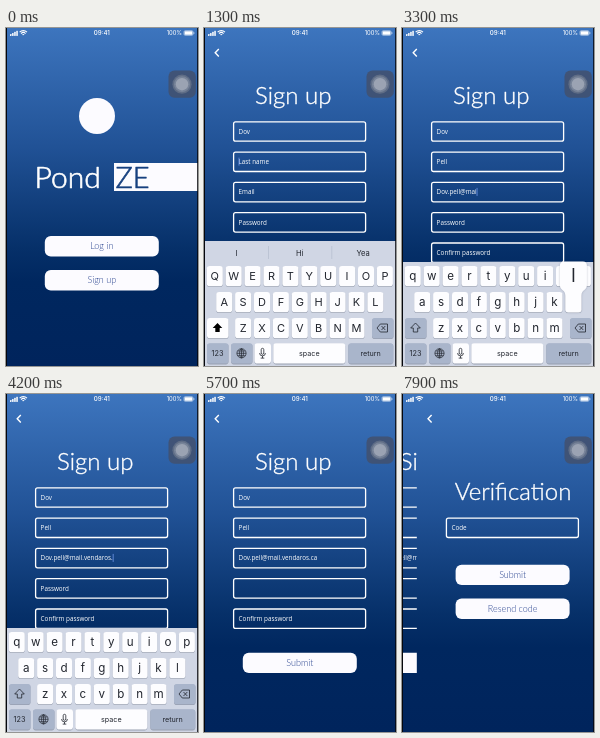
An HTML page with a canvas that plays this animation: 192x338 px, repeating every 8000 ms.

```html
<!DOCTYPE html>
<html lang="en">
<head>
<meta charset="utf-8">
<title>Sign up flow</title>
<style>
  html, body { margin: 0; width: 100%; height: 100%; overflow: hidden; background: #000; }
  canvas { display: block; width: 100vw; height: 100vh; }
</style>
</head>
<body>
<canvas id="stage"></canvas>
<script>
const W = 192, H = 338, LOOP = 8000;
const THIN = '"Lato", sans-serif', TEXT = '"Open Sans", sans-serif', KEY = '"Inter", sans-serif';
const INK = '#22262f', PAPER = '#fcfbff';
const cv = document.getElementById('stage');
const c = cv.getContext('2d');

const clamp = v => Math.max(0, Math.min(1, v));
const easeOut = (t, start, dur) => 1 - (1 - clamp((t - start) / dur)) ** 3;

// Typing schedule: characters and the moment each one lands
const typed = [
  { text: 'Dov', at: [700, 800, 900] },
  { text: 'Pell', at: [1400, 1500, 1600, 1700] },
  { text: 'Dov.pell@mail.vendaros.ca',
    at: [2000, 2120, 2240, 2460, 2660, 2760, 2840, 2920, 3040, 3140, 3200, 3270, 3340,
         3490, 3600, 3670, 3740, 3800, 3860, 3920, 3980, 4020, 4110, 4300, 4420] }
];
const focusAt = [520, 1050, 1850, 4750];
const hints = ['First name', 'Last name', 'Email', 'Password', 'Confirm password'];
const fieldY = i => 93.8 + i * 30.3;

function valueAt(i, t) {
  const f = typed[i];
  return f ? f.text.slice(0, f.at.filter(a => a <= t).length) : '';
}

function box(x, y, w, h, r, fill) {
  c.beginPath();
  c.roundRect(x, y, w, h, r);
  if (fill) { c.fillStyle = fill; c.fill(); }
}

function label(s, x, y, size, family, color, align = 'left', weight = 400) {
  c.font = `${weight} ${size}px ${family}`;
  c.fillStyle = color;
  c.textAlign = align;
  c.textBaseline = 'alphabetic';
  c.fillText(s, x, y);
}

// Light lettering with a slightly thickened stroke
function heading(s, x, y, size, color, align, extra) {
  label(s, x, y, size, THIN, color, align, 300);
  c.strokeStyle = color;
  c.lineWidth = extra;
  c.lineJoin = 'round';
  c.strokeText(s, x, y);
}

function line(points, color, width) {
  c.beginPath();
  points.forEach(([x, y], i) => i ? c.lineTo(x, y) : c.moveTo(x, y));
  c.strokeStyle = color;
  c.lineWidth = width;
  c.stroke();
}

function backdrop() {
  const g = c.createLinearGradient(0, 0, 0, H);
  g.addColorStop(0, '#3d75be');
  g.addColorStop(0.35, '#215296');
  g.addColorStop(0.65, '#063069');
  g.addColorStop(0.75, '#00275f');
  g.addColorStop(1, '#00245c');
  c.fillStyle = g;
  c.fillRect(0, 0, W, H);
}

function button(s, y, pressed) {
  box(38.8, y, 114, 20.4, 6, pressed ? '#b9c4da' : PAPER);
  label(s, 95.8, y + 13, 9, THIN, '#2b4590', 'center', 300);
}

function field(y, s, caret) {
  box(29.6, y, 132, 19.4, 2);
  c.strokeStyle = '#fff';
  c.lineWidth = 1.3;
  c.stroke();
  label(s, 34.6, y + 12, 6.3, TEXT, '#fff');
  if (caret !== undefined) {
    c.fillStyle = '#6f97ea';
    c.fillRect(34.6 + c.measureText(caret).width, y + 5.5, 0.8, 8);
  }
}

function chevron() {
  line([[14.8, 21], [11.2, 24.8], [14.8, 28.6]], '#fff', 1.4);
}

function home(t) {
  backdrop();
  c.beginPath();
  c.arc(91, 88, 18, 0, 7);
  c.fillStyle = PAPER;
  c.fill();
  heading('Pond', 28.5, 160, 30, '#fff', 'left', 0.7);
  c.fillStyle = PAPER;
  c.fillRect(108, 135, 84, 28);
  heading('ZE', 109.5, 160, 29, '#17407f', 'left', 0.6);
  button('Log in', 208);
  button('Sign up', 242, t > 60 && t < 160);
}

function signUp(t) {
  backdrop();
  chevron();
  heading('Sign up', 89.2, 76, 24, '#fff', 'center', 0.4);
  const focus = t < 4800 ? focusAt.filter(a => a <= t).length - 1 : -1;
  hints.forEach((hint, i) => {
    const v = valueAt(i, t);
    const hidden = (i === 3 && t > 5300) || (i === 4 && t > 6500);
    field(fieldY(i), hidden ? '' : v || hint, i === focus ? v : undefined);
  });
  button('Submit', 258.7, t > 7560 && t < 7700);
}

function verify() {
  backdrop();
  chevron();
  heading('Verification', 96.2, 106, 24, '#fff', 'center', 0.4);
  field(fieldY(1), 'Code');
  button('Submit', 170.7);
  button('Resend code', 204.6);
}

function push(from, to, p) {
  c.save();
  c.translate(-0.3 * W * p, 0);
  from();
  c.restore();
  c.save();
  c.translate(W * (1 - p), 0);
  to();
  c.restore();
}

// Keyboard
const rowY = [248, 274, 300, 325.3];
const SPECIAL = '#a9b5cb';

function keyList(mode) {
  const keys = [];
  const row = (chars, x, step, y, w) =>
    [...chars].forEach((ch, i) => keys.push({ ch, x: x + i * step, y, w }));
  if (mode === 'sym') {
    row('1234567890', 10.8, 18.9, rowY[0], 16);
    row('-/:;()$&@"', 10.8, 18.9, rowY[1], 16);
    row('.,?!’', 43.5, 26, rowY[2], 23);
  } else {
    const shape = s => mode === 'upper' ? s.toUpperCase() : s;
    row(shape('qwertyuiop'), 10.8, 18.9, rowY[0], 16);
    row(shape('asdfghjkl'), 20.2, 18.9, rowY[1], 16);
    row(shape('zxcvbnm'), 39.1, 18.9, rowY[2], 16);
  }
  return keys;
}

function cap(x, y, w, fill = '#fdfdff') {
  box(x, y - 9.5, w, 20.6, 2.8, '#979fb0');
  box(x, y - 10, w, 20.2, 2.8, fill);
}

function shiftIcon(on) {
  c.beginPath();
  [[13.5, 295], [18.3, 300], [15.7, 300], [15.7, 304], [11.3, 304], [11.3, 300], [8.7, 300]]
    .forEach(([x, y]) => c.lineTo(x, y));
  c.closePath();
  c.fillStyle = c.strokeStyle = on ? '#000' : INK;
  c.lineWidth = 0.8;
  on ? c.fill() : c.stroke();
}

function deleteIcon() {
  line([[173, 300], [176.3, 296], [183.5, 296], [183.5, 304], [176.3, 304], [173, 300]], INK, 0.8);
  line([[177.5, 298], [181.3, 302]], INK, 0.8);
  line([[181.3, 298], [177.5, 302]], INK, 0.8);
}

function globeIcon(x, y) {
  c.strokeStyle = INK;
  c.lineWidth = 0.7;
  c.beginPath();
  c.ellipse(x, y, 4.6, 4.6, 0, 0, 7);
  c.moveTo(x + 2, y);
  c.ellipse(x, y, 2, 4.6, 0, 0, 7);
  c.stroke();
  line([[x - 4.6, y], [x + 4.6, y]], INK, 0.7);
  line([[x, y - 4.6], [x, y + 4.6]], INK, 0.7);
  line([[x - 4, y - 2.3], [x + 4, y - 2.3]], INK, 0.6);
  line([[x - 4, y + 2.3], [x + 4, y + 2.3]], INK, 0.6);
}

function micIcon(x, y) {
  box(x - 1.3, y - 5, 2.6, 6, 1.3);
  c.strokeStyle = INK;
  c.lineWidth = 0.8;
  c.stroke();
  c.beginPath();
  c.arc(x, y - 0.3, 2.9, 0, Math.PI);
  c.stroke();
  line([[x, y + 2.6], [x, y + 4.8]], INK, 0.8);
  line([[x - 1.8, y + 4.8], [x + 1.8, y + 4.8]], INK, 0.8);
}

function popup({ ch, x, y, w }) {
  const k = w / 2, b = k + 5.5, top = y - 40.5;
  c.save();
  c.shadowColor = 'rgba(40,50,75,.3)';
  c.shadowBlur = 2;
  c.beginPath();
  c.moveTo(x - b + 4, top);
  c.arcTo(x + b, top, x + b, top + 5, 4);
  c.lineTo(x + b, y - 17);
  c.bezierCurveTo(x + b, y - 11, x + k, y - 13, x + k, y - 6);
  c.arcTo(x + k, y + 10.5, x, y + 10.5, 3);
  c.arcTo(x - k, y + 10.5, x - k, y, 3);
  c.lineTo(x - k, y - 6);
  c.bezierCurveTo(x - k, y - 13, x - b, y - 11, x - b, y - 17);
  c.arcTo(x - b, top, x - b + 4, top, 4);
  c.fillStyle = '#fdfdff';
  c.fill();
  c.restore();
  label(ch, x, y - 20, 18, KEY, INK, 'center');
}

function keyboard(t) {
  const shown = easeOut(t, 540, 130) - easeOut(t, 4800, 220);
  if (shown <= 0) return;
  const i = t < 1050 ? 0 : t < 1850 ? 1 : 2;
  const f = typed[i];
  const sym = f.at.some((a, n) => '.@'.includes(f.text[n]) && t > a - 60 && t < a + 70);
  const mode = sym ? 'sym' : valueAt(i, t) ? 'lower' : 'upper';
  const top = i < 2 ? 213 : 234;

  c.save();
  c.translate(0, (1 - shown) * (H - top));
  c.fillStyle = '#d0d6e4';
  c.fillRect(0, top, W, H - top);
  if (i < 2) {
    ['I', 'Hi', 'Yea'].forEach((s, n) => label(s, 32.5 + n * 63.3, 228, 7.6, KEY, INK, 'center'));
    c.fillStyle = '#b3bccd';
    c.fillRect(64, 218, 0.7, 13);
    c.fillRect(127.5, 218, 0.7, 13);
  }

  const keys = keyList(mode);
  keys.forEach(k => {
    cap(k.x - k.w / 2, k.y, k.w);
    label(k.ch, k.x, k.y + (mode === 'lower' ? 3.5 : 4), mode === 'lower' ? 11.6 : 11, KEY, INK, 'center');
  });

  cap(3, rowY[2], 21.5, mode === 'upper' ? '#fdfdff' : SPECIAL);
  if (sym) label('#+=', 13.7, 302.5, 6.5, KEY, INK, 'center');
  else shiftIcon(mode === 'upper');
  cap(168, rowY[2], 21.5, SPECIAL);
  deleteIcon();

  cap(3, rowY[3], 21.5, SPECIAL);
  label(sym ? 'ABC' : '123', 13.5, 327.9, 7.3, KEY, INK, 'center');
  cap(27, rowY[3], 21.5, SPECIAL);
  globeIcon(37.5, 325.3);
  cap(50.5, rowY[3], 16.5);
  micIcon(58.5, 325.3);
  cap(69.3, rowY[3], 72);
  label('space', 105.3, 327.6, 7.2, KEY, INK, 'center');
  cap(144.3, rowY[3], 45, SPECIAL);
  label('return', 166.6, 327.6, 7.2, KEY, INK, 'center');

  const hit = f.at.findLastIndex(a => t >= a - 50 && t < a + 50);
  const key = hit >= 0 && keys.find(k => k.ch.toLowerCase() === f.text[hit].toLowerCase());
  if (key) popup(key);
  c.restore();
}

function statusBar() {
  for (let i = 0; i < 4; i++) box(4 + i * 2.1, 6 - i * 1.1, 1.5, 1.9 + i * 1.1, 0.4, '#fff');
  c.strokeStyle = '#fff';
  c.lineWidth = 1.1;
  for (const r of [1.2, 3.2, 5.2]) {
    c.beginPath();
    c.arc(17.3, 7.8, r, -Math.PI * 0.75, -Math.PI * 0.25);
    c.stroke();
  }
  label('09:41', 95.8, 7.2, 6.2, KEY, '#fff', 'center', 500);
  label('100%', 176, 7.1, 5.8, KEY, '#fff', 'right');
  box(178, 2.7, 9, 4.6, 1.2);
  c.lineWidth = 0.5;
  c.stroke();
  box(178.6, 3.3, 7.8, 3.4, 0.7, '#fff');
  box(187.6, 4.2, 0.7, 1.6, 0.3, '#fff');
}

function assist() {
  box(162.5, 42.5, 27.3, 27.3, 6, 'rgba(66,80,110,.86)');
  [[9.6, '#5f6d86'], [8, '#788499'], [6.2, '#9ba3b3']].forEach(([r, color]) => {
    c.beginPath();
    c.arc(176, 56.2, r, 0, 7);
    c.fillStyle = color;
    c.fill();
  });
}

function draw(t) {
  if (t < 1000) push(() => home(t), () => signUp(t), easeOut(t, 150, 350));
  else push(() => signUp(t), verify, easeOut(t, 7700, 350));
  keyboard(t);
  statusBar();
  assist();
  c.fillStyle = '#05070c';
  c.fillRect(0, 0, 1, H);
  c.fillRect(W - 0.8, 0, 0.8, H);
}

function frame() {
  const dpr = window.devicePixelRatio || 1;
  const w = Math.round(innerWidth * dpr), h = Math.round(innerHeight * dpr);
  if (cv.width !== w || cv.height !== h) {
    cv.width = w;
    cv.height = h;
  }
  c.setTransform(w / W, 0, 0, h / H, 0, 0);
  draw(performance.now() % LOOP);
  requestAnimationFrame(frame);
}
frame();
</script>
</body>
</html>
```
